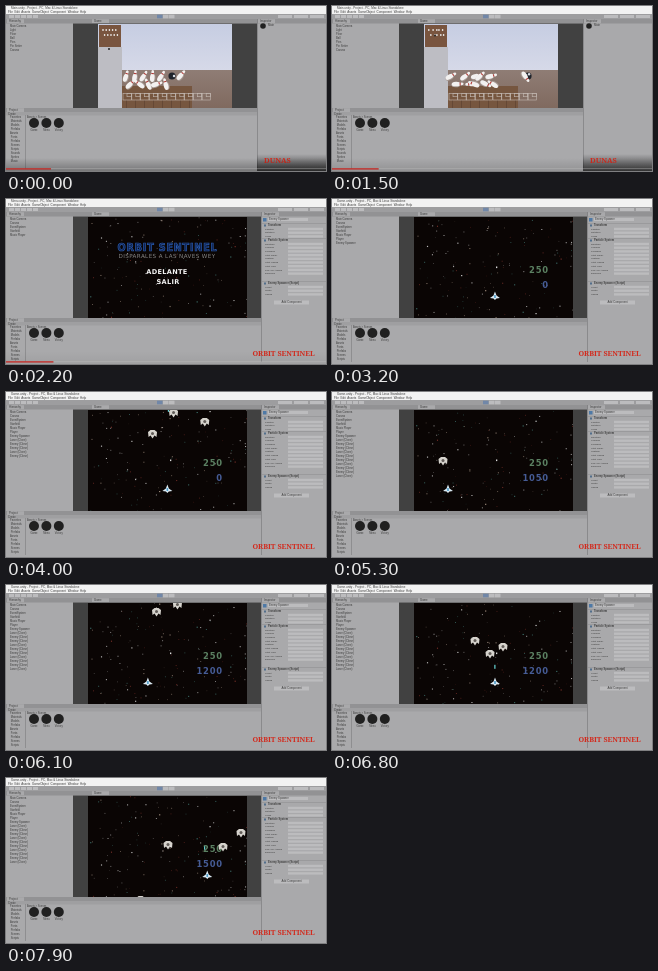
Recreate the animation shown at these times as an HTML page with a canvas. Size 320 px wide and 165 px high, loop 8 s.

```html
<!DOCTYPE html>
<html lang="es">
<head>
<meta charset="utf-8">
<style>
html, body { margin: 0; width: 100%; height: 100%; overflow: hidden; background: #a9a9ab; }
canvas { display: block; width: 320px; height: 165px; }
</style>
</head>
<body>
<canvas id="stage" width="320" height="165"></canvas>
<script>
const c = document.getElementById('stage').getContext('2d');
const LOOP = 8000, MENU = 2000, GAME = 3100, PAUSE = 5100, CUT = 5300;
const SANS = '"Liberation Sans", sans-serif', WIDE = '"DejaVu Sans", sans-serif', SERIF = '"Noto Serif", serif';
const PANEL = '#a9a9ab', BAR = '#929294', FIELD = '#bcbcbe', LINE = '#7d7d7f', INK = '#3c3c3c', SIDE = '#414141';

const rand = n => { const v = Math.sin(n * 127.1 + 11.7) * 43758.5453; return v - Math.floor(v); };
const mix = (a, b, k) => a + (b - a) * k;
const smooth = k => k * k * (3 - 2 * k);
const repeat = (n, draw) => { for (let i = 0; i < n; i++) draw(i); };

function box(x, y, w, h, color) {
  c.fillStyle = color;
  c.fillRect(x, y, w, h);
}
function fade(x, y, w, h, top, bottom) {
  const g = c.createLinearGradient(0, y, 0, y + h);
  g.addColorStop(0, top);
  g.addColorStop(1, bottom);
  box(x, y, w, h, g);
}
function text(s, x, y, size, { color = INK, align = 'left', family = SANS, weight = '', gap = 0 } = {}) {
  c.font = `${weight} ${size}px ${family}`;
  c.letterSpacing = gap + 'px';
  c.textAlign = align;
  c.textBaseline = 'middle';
  c.fillStyle = color;
  c.fillText(s, x, y);
}
function oval(x, y, rx, ry, color) {
  c.fillStyle = color;
  c.beginPath();
  c.ellipse(x, y, rx, ry, 0, 0, 7);
  c.fill();
}
// Left-right symmetric polygon from the points of its right half
function mirrored(x, y, half, color) {
  c.fillStyle = color;
  c.beginPath();
  half.forEach(([px, py]) => c.lineTo(x + px, y + py));
  half.slice().reverse().forEach(([px, py]) => c.lineTo(x - px, y + py));
  c.fill();
}
function clip(x, y, w, h, draw) {
  c.save();
  c.beginPath();
  c.rect(x, y, w, h);
  c.clip();
  draw();
  c.restore();
}

// ---- Editor window ----
function rows(names, x, y, step) {
  names.forEach((s, i) => text(s, x, y + i * step, 2.7));
}
function editor(title, split, bottom, objects) {
  box(0, 0, 320, 165, PANEL);
  box(0, 0, 320, 8, '#f2f2f2');
  text(title, 5, 2.2, 3);
  text('File  Edit  Assets  GameObject  Component  Window  Help', 2, 6.2, 3);
  box(0, 8, 320, 5, '#9d9d9f');
  repeat(5, i => box(3 + i * 6, 9, 5, 3, FIELD));
  repeat(3, i => box(151 + i * 6, 8.7, 5.5, 3.6, i ? FIELD : '#7187a8'));
  repeat(3, i => box(272 + i * 16, 9, 14, 3, FIELD));
  box(0, 13, 320, 4.5, BAR);
  const tabs = [['Hierarchy', 1, 13.2], ['Game', 86, 13.2], ['Inspector', split + 1, 13.2], ['Project', 1, bottom + .2]];
  box(0, bottom, split, 4, BAR);
  for (const [s, x, y] of tabs) {
    box(x, y, 17, 4, PANEL);
    text(s, x + 2, y + 2.2, 2.8);
  }
  rows(objects, 4, 20, 4);
  box(67, 17.5, split - 67, bottom - 17.5, SIDE);

  box(0, bottom + 4, split, 3.5, '#9f9fa1');
  text('Create', 2, bottom + 5.8, 2.6);
  text('Assets > Scenes', 21, bottom + 8.8, 2.6);
  const tree = ['Favorites', ' Materials', ' Models', ' Prefabs', 'Assets', ' Fonts', ' Prefabs',
    ' Scenes', ' Scripts', ' Sounds', ' Sprites', ' Music'];
  rows(tree.slice(0, Math.floor((157 - bottom) / 4)), 4, bottom + 9.5, 4);
  box(19, bottom + 7, .6, 156 - bottom, LINE);
  ['Game', 'Menu', 'Victory'].forEach((s, i) => {
    const x = 28 + i * 12.4;
    oval(x, bottom + 15, 5, 5, '#202020');
    text(s, x, bottom + 22.2, 2.6, { align: 'center' });
  });
  box(split, 13, .7, 150, LINE);
}
function section(name, y, labels) {
  box(256, y, 64, .5, '#8b8b8d');
  text(name, 262, y + 2.4, 2.7, { weight: 'bold' });
  box(258, y + 1.5, 2, 2, '#536f8b');
  labels.forEach((s, i) => {
    const ry = y + 6 + i * 3.7;
    text(s, 259, ry, 2.5);
    box(282, ry - 1.2, 35, 2.4, FIELD);
  });
}
function inspector() {
  box(257, 19, 3.5, 3.5, '#4e79a6');
  box(262, 19, 40, 3, FIELD);
  text('Enemy Spawner', 263, 20.6, 2.7);
  section('Transform', 24, ['Position', 'Rotation', 'Scale']);
  section('Particle System', 39, ['Duration', 'Looping', 'Prewarm', 'Start Delay', 'Lifetime',
    'Start Speed', 'Start Size', 'Play On Awake', 'Emission']);
  section('Enemy Spawner (Script)', 82, ['Script', 'Width', 'Speed']);
  box(268, 101.5, 35, 4, FIELD);
  text('Add Component', 285.5, 103.6, 2.8, { align: 'center' });
}
function caption(s, x, size) {
  text(s, x, 154.8, size, { color: '#d32a1d', align: 'center', family: SERIF, weight: 900 });
}
function player(t) {
  fade(0, 152, 320, 13, '#0000', `rgba(0,0,0,${.3 * (1 - t / 2700)})`);
  box(0, 162.3, 320, .8, '#bbb8');
  box(0, 162.3, 45 + t / 900, 1.2, '#c51b16');
}

// ---- Bowling ----
function pin(x, y, turn) {
  c.save();
  c.translate(x, y);
  c.rotate(turn);
  oval(.7, 2, 2.6, 4.4, '#a79a94');
  oval(0, 1.7, 2.3, 4.3, '#f3f1f0');
  oval(0, -3.9, 1.4, 2, '#f3f1f0');
  box(-1.2, -3, 2.4, 1.1, '#b23a36');
  c.restore();
}
function lane(t) {
  fade(92, 18, 134, 46, '#c6cde2', '#d6d9e8');
  box(92, 41, 24, 61, '#bdbdc3');
  fade(116, 64, 110, 38, '#8f7d75', '#806a5f');
  box(116, 80, 70, 22, '#76563f');
  repeat(8, i => box(120 + i * 9, 94, .6, 8, '#5a4030'));
  box(93, 19, 22, 22, '#79553f');

  const fall = 1 - Math.exp(-t / 550);
  repeat(10, i => {
    const front = i % 2, x = 120 + i * 4.4, y = front ? 78 : 70;
    const lean = (rand(i) - .4) * (front ? 2.8 : 1);
    const drift = (rand(i + 30) * 14 - 3) * fall;
    pin(x + drift, y, lean + fall * Math.sign(lean) * .8);
    oval(97 + i * 1.6 + drift * .2, 24 + front * 5, .8, 1.1, '#eee');
  });
  const x = 166 + t * .02, spin = t / 130;
  oval(x, 70, 3.6, 3.6, '#20242b');
  oval(x + 2 * Math.cos(spin), 70 + 2 * Math.sin(spin), 1.2, 1.2, '#d8dde4');
  pin(175 + 20 * fall, 69 + 2 * fall, .7 + 2 * fall);
  oval(103, 43 - t * .009, 1, 1, '#222');

  c.strokeStyle = '#c4b9b2';
  c.lineWidth = .6;
  repeat(10, i => {
    c.strokeRect(117 + i * 8.8, 87.5, 8.3, 6.5);
    c.strokeRect(121 + i * 8.8, 87.5, 4.3, 3.2);
  });
}
function bowling(t) {
  editor('Main.unity - Project - PC, Mac & Linux Standalone', 251, 102,
    ['Main Camera', 'Light', 'Floor', 'Ball', 'Pins', 'Pin Setter', 'Canvas']);
  oval(257, 20, 2.8, 2.8, '#202020');
  text('Main', 262, 19.6, 2.8);
  clip(92, 18, 134, 84, () => lane(t));
  fade(251, 148, 69, 17, '#0000', '#000a');
  caption('DUNAS', 271.5, 7.4);
  player(t);
}

// ---- Space shooter ----
const ENEMY_SPEED = .06, SHOT_SPEED = .2, SHOT_STEP = 520, POINTS = 150;
// Ship x at a few moments
const SHIP = [[GAME, 163], [4800, 160], [CUT, 168], [CUT, 116], [6800, 163], [LOOP, 202]];
// A known place of each enemy, and when it is shot down
const ENEMIES = [
  { at: 4400, x: 149, y: 66, shot: 4400 },
  { at: 4800, x: 172, y: 69 }, { at: 4800, x: 200, y: 78 }, { at: 4800, x: 186, y: 22 },
  { at: 5300, x: 111, y: 69, shot: 5800 },
  { at: 6800, x: 143, y: 56 }, { at: 6800, x: 171, y: 62, shot: 7150 }, { at: 6800, x: 158, y: 69, shot: 7100 },
  { at: 7900, x: 162, y: 67 }, { at: 7900, x: 235, y: 55 }, { at: 7900, x: 217, y: 69 }
];

function shipX(t) {
  const i = SHIP.findIndex(([at]) => at > t);
  const [a, from] = SHIP[i - 1], [b, to] = SHIP[i];
  return mix(from, to, smooth((t - a) / (b - a)));
}
function stars(t) {
  box(82, 18, 159, 101, '#0a0504');
  repeat(150, i => {
    const y = 18 + (rand(i + 200) * 101 + t * (.005 + rand(i + 400) * .009)) % 101;
    const size = .5 + rand(i + 600) * .7;
    c.globalAlpha = .3 + rand(i + 800) * .6;
    box(82 + rand(i) * 159, y, size, size, ['#ddd', '#c9b3a0', '#86362e', '#4d908b', '#eee'][i % 5]);
  });
  c.globalAlpha = 1;
}
function enemy(x, y) {
  mirrored(x, y, [[2, -4], [4.5, -2], [4, 3], [2, 1.5], [0, 4.5]], '#d6d3cd');
  oval(x, y - .5, 1.5, 1.5, '#625d59');
}
function ship(x, y) {
  mirrored(x, y, [[0, -4.5], [1.5, -.5], [5, 2], [1.5, 2.5], [0, 4]], '#dceaf3');
  box(x - .8, y - 1, 1.6, 3, '#4f9dca');
}
function menu() {
  const title = { color: '#10204a', align: 'center', family: WIDE, weight: 'bold', gap: .8 };
  text('ORBIT SENTINEL', 161.5, 49, 9.6, title);
  c.strokeStyle = '#285bb0';
  c.lineWidth = .7;
  c.strokeText('ORBIT SENTINEL', 161.5, 49);
  text('DISPARALES A LAS NAVES WEY', 161, 57.5, 5.6, { ...title, color: '#858585', weight: '', gap: .4 });
  text('ADELANTE', 161, 73.5, 6.6, { ...title, color: '#f4f4f4', gap: .3 });
  text('SALIR', 162, 83.5, 6.6, { ...title, color: '#f4f4f4', gap: .3 });
}
function battle(t) {
  const scene = t < CUT ? GAME : CUT;
  for (let start = GAME + SHOT_STEP; start <= t; start += SHOT_STEP) {
    if (start >= scene) box(shipX(start) - .5, 92 - (t - start) * SHOT_SPEED, 1.2, 4, '#67d5d5');
  }
  const score = ENEMIES.filter(e => e.shot <= t).length * POINTS + (t < CUT ? 0 : 6 * POINTS);
  const digits = { align: 'right', family: WIDE, weight: 'bold', gap: .7 };
  text('250', 216.7, 71.5, 8.4, { ...digits, color: '#5b8062' });
  text(String(score), 216.7, 86.5, 8.4, { ...digits, color: '#465c96' });
  ENEMIES.forEach(({ at, x, y, shot = LOOP }, i) => {
    const sameScene = at < CUT === t < CUT;
    if (sameScene && t < shot) enemy(x + (t - at) * (rand(i) - .5) * .03, y + (t - at) * ENEMY_SPEED);
  });
  ship(shipX(t), 97);
  box(164, 67.5, 1.3, 1.6, '#ddd');
}
function shooter(t) {
  if (t >= PAUSE && t < CUT) t = PAUSE;
  const playing = t >= GAME;
  const objects = ['Main Camera', 'Canvas', 'EventSystem', 'Starfield', 'Music Player'];
  if (playing) {
    objects.push('Player', 'Enemy Spawner');
    const clones = Math.min(10, Math.floor((t - GAME) / 170));
    repeat(clones, i => objects.push(i % 3 ? 'Enemy (Clone)' : 'Laser (Clone)'));
  }
  editor((playing ? 'Game' : 'Menu') + '.unity - Project - PC, Mac & Linux Standalone', 255, 119, objects);
  inspector();
  clip(82, 18, 159, 101, () => {
    stars(t);
    if (playing) battle(t); else menu();
  });
  caption('ORBIT SENTINEL', 277.5, 7.2);
  if (t < 2700) player(t);
}

const begin = performance.now();
function frame() {
  const t = (performance.now() - begin) % LOOP;
  if (t < MENU) bowling(t); else shooter(t);
  requestAnimationFrame(frame);
}
frame();
</script>
</body>
</html>
```
